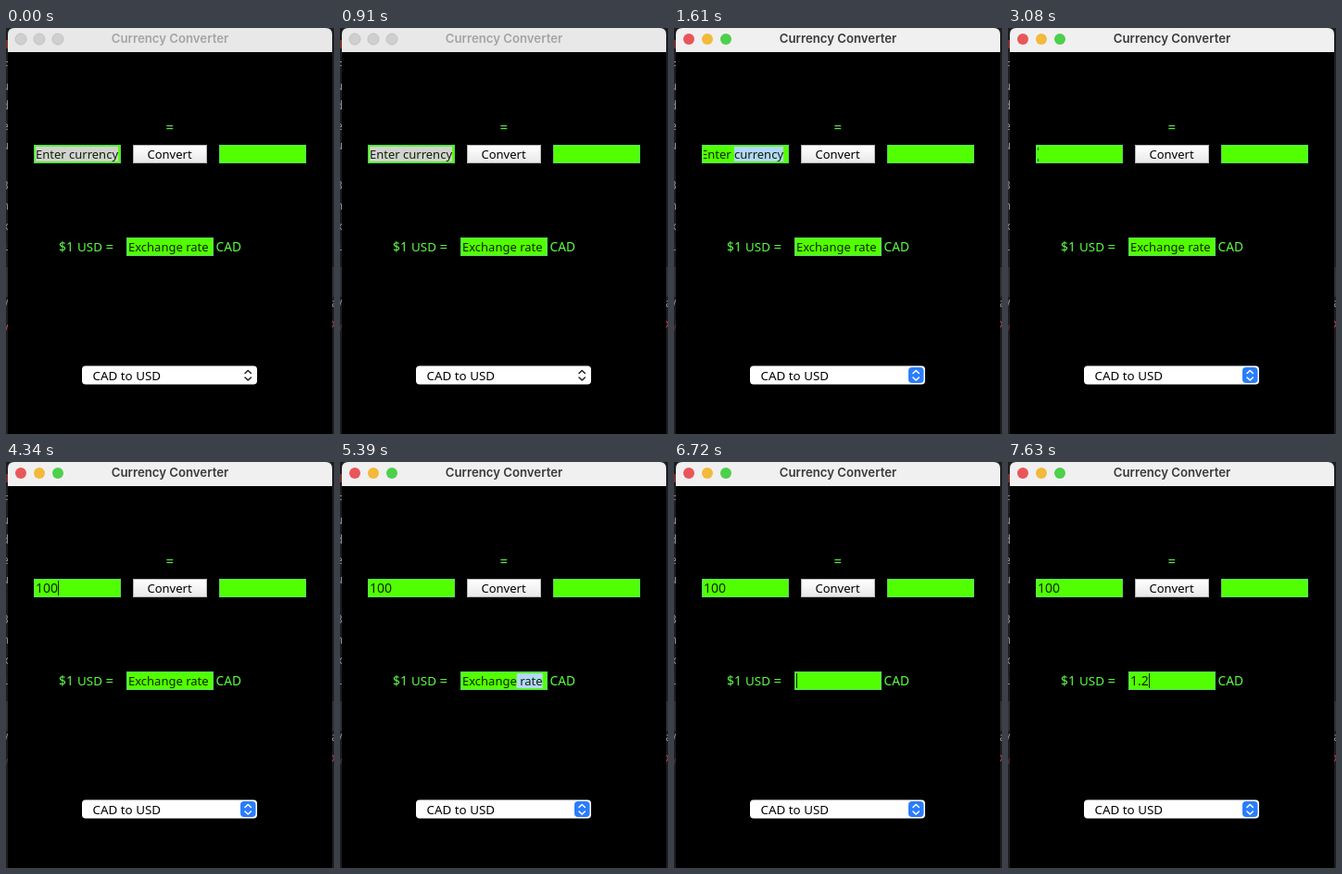
These frames come from a looping animation (354 px wide and 438 px high, 8 s). An HTML page:

```html
<!DOCTYPE html>
<html lang="en">
<head>
<meta charset="utf-8">
<title>Currency Converter</title>
<style>
  html, body { margin: 0; width: 100%; height: 100%; overflow: hidden; background: #1d1d1f; }
  svg { display: block; width: 354px; height: 438px; }
  text { font: 500 13px "Noto Sans", sans-serif; white-space: pre; }
  .title { font: 600 13.2px Inter, sans-serif; text-anchor: middle; }
  .label { fill: #5cff45; }
  .code { font: 12px "Noto Sans Mono", monospace; fill: #8d8f93; }
  .ink { fill: #0d2500; }
  .field { fill: #52ff00; stroke: #58d866; }
  .arrows { fill: none; stroke-width: 1.5; stroke-linecap: round; stroke-linejoin: round; }
</style>
</head>
<body>
<svg viewBox="0 0 354 438">
  <defs>
    <linearGradient id="face" x2="0" y2="1">
      <stop offset="0" stop-color="#fff"/>
      <stop offset=".5" stop-color="#f4f4f4"/>
      <stop offset="1" stop-color="#e8e8e8"/>
    </linearGradient>
    <clipPath id="clipAmount"><rect x="32" y="127" width="91" height="18"/></clipPath>
    <clipPath id="clipRate"><rect x="132" y="227" width="91" height="18"/></clipPath>
  </defs>

  <rect width="354" height="438" fill="#1d1d1f"/>
  <rect y="258" width="354" height="32" fill="#303032"/>
  <g id="editor"></g>
  <text class="code" x="351" y="301">a</text>
  <text class="code" x="351" y="323" style="fill:#d0405a">x</text>

  <rect x="2" y="20" width="350" height="418" fill="#000"/>
  <path id="bar" d="M2 26V7Q2 0 9 0H345Q352 0 352 7V26Z"/>
  <g id="lights"></g>
  <text id="title" class="title" x="177" y="16">Currency Converter</text>

  <text class="label" x="172.500" y="111.500" style="font-size:15px">=</text>
  <rect x="137.500" y="126.500" width="79" height="19" fill="url(#face)" stroke="#b4b4b4"/>
  <text x="152.500" y="141">Convert</text>

  <g id="fields"></g>
  <rect class="field" x="230.500" y="126.500" width="93" height="19"/>

  <g class="label">
    <text x="57" y="241" style="font-size:13.8px">$1</text>
    <text x="77" y="241" style="font-size:13.4px">USD</text>
    <text x="107.500" y="241" style="font-size:15px">=</text>
    <text x="226.500" y="241" style="font-size:13.7px">CAD</text>
  </g>

  <rect x="82" y="364.500" width="189" height="20" rx="4" fill="#fff"/>
  <text x="93.500" y="380" style="font-size:13.4px">CAD to USD</text>
  <rect id="knob" x="253" y="366" width="16.500" height="17" rx="4" fill="#2a7dfb"/>
  <path id="arrows" class="arrows" d="M258 372.500l3.200-3 3.200 3M258 377l3.200 3 3.200-3"/>
</svg>

<script>
const LOOP = 8000, ACTIVE_AT = 1330;
const $ = id => document.getElementById(id);

function set(el, attrs) {
  for (const key in attrs) el.setAttribute(key, attrs[key]);
}

function add(parent, tag, attrs, content = "") {
  const el = document.createElementNS("http://www.w3.org/2000/svg", tag);
  set(el, attrs);
  el.textContent = content;
  return parent.appendChild(el);
}

const codeLine = (char, y) =>
  add($("editor"), "text", { class: "code", x: 3, y, "text-anchor": "end" }, char);
[..."Fudeu"].forEach((char, i) => codeLine(char, 45 + 21.5 * i));
[..."3nxi"].forEach((char, i) => codeLine(char, 174 + 22 * i));
codeLine("v", 300);
const errorMark = codeLine("v", 327);
add($("editor"), "rect", { y: 13, width: 2, height: 9, fill: "#7a3326" });

const lightColors = ["#e9565a", "#f2b93b", "#4dd04a"];
const lights = lightColors.map((_, i) => add($("lights"), "circle", { cx: 16 + 20 * i, cy: 12, r: 6 }));

const ENTER = "Enter currency", RATE = "Exchange rate";

// Steps: [time, text, selection start, selection end, scroll].
// Equal start and end give a caret; none gives an unfocused field.
const amountSteps = [
  [0, ENTER, 0, 14],
  [1400, ENTER, 14, 14, -3],
  [1470, ENTER, 12, 14, -3],
  [1540, ENTER, 9, 14, -3],
  [1610, ENTER, 6, 14, -3],
  [1680, ENTER, 2, 14, -3],
  [1820, ENTER, 0, 14],
  [2170, "", 0, 0],
  [2730, ""],
  [3150, "1", 1, 1],
  [3290, "10", 2, 2],
  [3780, "10"],
  [4200, "10", 2, 2],
  [4340, "100", 3, 3],
  [4830, "100"]
];
const rateSteps = [
  [0, RATE],
  [5250, RATE, 13, 13],
  [5320, RATE, 11, 13],
  [5390, RATE, 8, 13],
  [5460, RATE, 4, 13],
  [5600, RATE, 1, 13],
  [5670, RATE, 0, 13],
  [6230, "", 0, 0],
  [6860, ""],
  [7070, "1", 1, 1],
  [7210, "1.", 2, 2],
  [7490, "1.2", 3, 3]
];

function makeField(x, y, clip, steps) {
  add($("fields"), "rect", { class: "field", x: x + 0.5, y: y + 0.5, width: 93, height: 19 });
  const inner = add($("fields"), "g", { "clip-path": `url(#${clip})` });
  const selection = add(inner, "rect", { y: y + 2, height: 16 });
  const text = add(inner, "text", { class: "ink", y: y + 15 });
  const caret = add(inner, "rect", { y: y + 2, width: 1, height: 16, fill: "#0d2500" });

  return (time, active) => {
    const [, value, from, to, scroll = 0] = steps.findLast(step => step[0] <= time);
    const left = x + 2 + scroll;
    text.textContent = value;
    text.style.font = /^\d/.test(value) ? '14px "Noto Sans", sans-serif' : "";
    set(text, { x: left });
    const edge = n => left + (n ? text.getSubStringLength(0, n) : 0);
    const focused = from !== undefined;
    set(caret, { x: focused ? Math.round(edge(to)) : 0, opacity: focused && from === to ? 1 : 0 });
    set(selection, {
      x: focused ? edge(from) : left,
      width: focused ? edge(to) - edge(from) : 0,
      fill: active ? "#b3d7ff" : "#d2d2d2"
    });
  };
}

const drawAmount = makeField(30, 126, "clipAmount", amountSteps);
const drawRate = makeField(130, 226, "clipRate", rateSteps);
const caretTips = add($("fields"), "path", { d: "M32.500 129v3M32.500 141v3", stroke: "#1c6b00" });

function draw(time) {
  const active = time >= ACTIVE_AT;
  set($("bar"), { fill: active ? "#f1f0f0" : "#e9e8e8" });
  set($("title"), { fill: active ? "#3b3a3a" : "#a5a4a4" });
  lights.forEach((light, i) => set(light, {
    fill: active ? lightColors[i] : "#d0cfcf",
    stroke: active ? "none" : "#c2c1c1"
  }));
  set($("knob"), { opacity: active ? 1 : 0 });
  set($("arrows"), { stroke: active ? "#fff" : "#222" });
  errorMark.style.fill = time < 70 ? "#e0405a" : "#6a3038";
  set(caretTips, { opacity: time >= 2730 && time < 3150 ? 1 : 0 });
  drawAmount(time, active);
  drawRate(time, active);
}

const start = performance.now();
function tick() {
  draw((performance.now() - start) % LOOP);
  requestAnimationFrame(tick);
}
tick();
</script>
</body>
</html>
```
